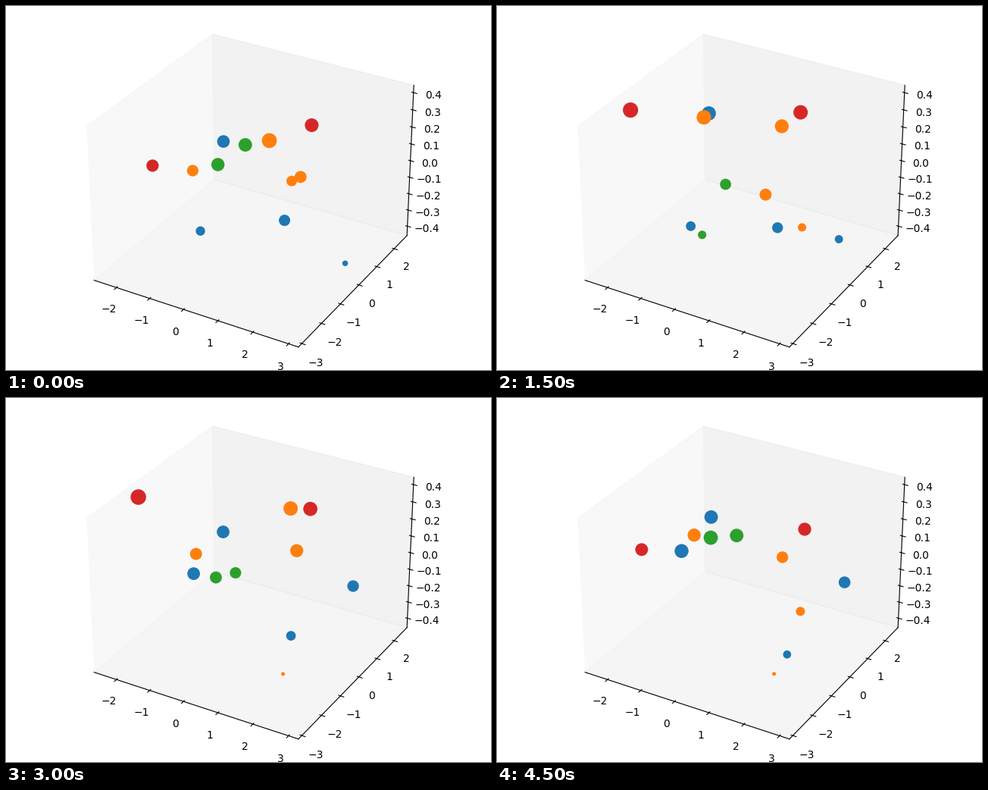
A matplotlib script for the animation above (5000 ms loop, 640x480 px).

```python
import numpy as np
import matplotlib.pyplot as plt
from matplotlib.animation import FuncAnimation

W, H, DPI = 640, 480, 100
STEPS, STEP_MS = 10, 500

# Each dot swings about its home along one line, back to front:
# color, home x, home y, swing x, swing y, swings per loop, phase.
DOTS = [
    ("C0", 283, 161, 4, 20, 2, 1.03),
    ("C3", 187, 185, 15, 64, 4, 2.74),
    ("C3", 410, 200, 10, 61, 3, -0.79),
    ("C2", 307, 213, -9, 33, 1, -1.17),
    ("C2", 276, 241, -6, 62, 1, -0.55),
    ("C1", 259, 182, -14, 37, 2, 1.21),
    ("C1", 376, 201, 1, 62, 4, 2.65),
    ("C1", 393, 248, 10, 48, 2, -2.64),
    ("C1", 357, 280, 10, 103, 4, -1.57),
    ("C0", 250, 252, 7, 51, 4, 1.05),
    ("C0", 378, 322, 11, 40, 3, -1.66),
    ("C0", 453, 287, -6, 52, 4, 1.49),
]
colors, *params = zip(*DOTS)
home_x, home_y, swing_x, swing_y, rate, phase = map(np.array, params)


def place(step):
    """Centres and diameters of all dots in pixels."""
    swing = np.sin(rate * 2 * np.pi * step / STEPS + phase)
    x = home_x + swing_x * swing
    y = home_y + swing_y * swing
    # The area grows with the height above the floor of the box.
    floor = 520 + 1.08 * home_y - 0.25 * home_x
    size = np.sqrt(np.clip(floor - 1.95 * y, 3**2, 21**2))
    return x, y, size


fig = plt.figure(figsize=(W / DPI, H / DPI), dpi=DPI)

box = fig.add_axes([0, 0, 1, 1], projection="3d")
box.grid(False)
box.set(xlim=(-2.685, 3.275), ylim=(-3.17, 2.76), zlim=(-0.4585, 0.4425))

# Flat layer in pixel units above the box.
layer = fig.add_axes([0, 0, 1, 1])
layer.set(xlim=(0, W), ylim=(H, 0))
layer.axis("off")
dots = layer.scatter(home_x, home_y, c=colors, linewidths=0)


def draw(step):
    x, y, size = place(step)
    dots.set_offsets(np.column_stack([x, y]) + 0.5)
    dots.set_sizes((size * 72 / DPI) ** 2, DPI)
    return [dots]


anim = FuncAnimation(fig, draw, frames=STEPS, interval=STEP_MS,
                     repeat=True, repeat_delay=0)
plt.show()
```
